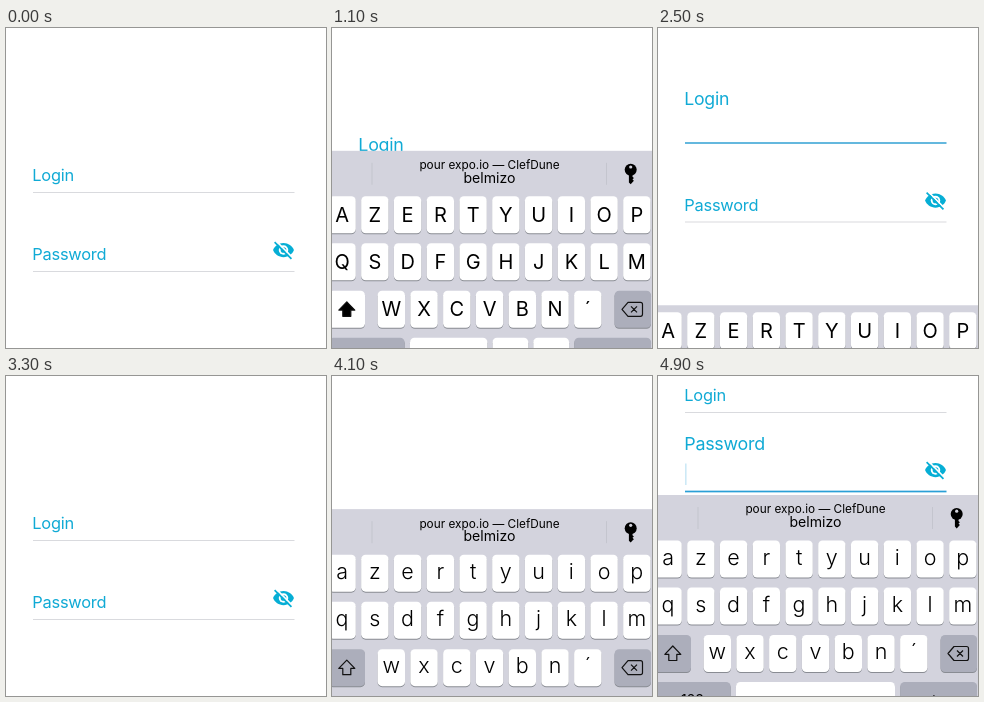
Animation of 320x320 px, one loop 5000 ms. Source, as an HTML page:

```html
<!DOCTYPE html>
<html lang="fr">
<head>
<meta charset="utf-8">
<title>Login form</title>
<style>
  html, body { margin: 0; width: 100%; height: 100%; overflow: hidden; background: #fff; }
  svg { display: block; width: 100%; height: 100%; }
  text { font-family: Inter, Roboto, "Liberation Sans", sans-serif; }
  .label { font-size: 16.4px; letter-spacing: -.015em; fill: #10aad5; }
  .caret { fill: #2a9fd6; }
  .keys text, .bar text { text-anchor: middle; fill: #000; }
  .bar rect { fill: #c4c5ce; }
</style>
</head>
<body>
<svg id="stage" viewBox="0 0 320 320">
  <g id="page"></g>
  <g id="keyboard">
    <rect id="tray" x="-4" width="328" height="230" fill="#d3d3dd"/>
    <g id="bar" class="bar">
      <rect x="39.5" y="12" width="1" height="22"/>
      <rect x="274" y="12" width="1" height="22"/>
      <text x="157.5" y="18.4" font-size="11.8">pour expo.io — ClefDune</text>
      <text x="157.5" y="32.3" font-size="14.1">belmizo</text>
      <g transform="translate(298.7 13)">
        <path d="M-1.8 10H1.8V13L3.2 14.3L1.8 15.6L3.2 17L1.8 18.4L0 20.4L-1.8 18.6Z"/>
        <circle cy="6" r="6"/>
        <circle cy="3.2" r="1.6" fill="#d3d3dd"/>
      </g>
    </g>
  </g>
</svg>
<script>
const LOOP = 5000;
const FLOAT = -30.5;
const PITCH = 32.75, KEY_W = 27.4, KEY_H = 37;
const ROWS = [45.5, 92.5, 140, 187];
const GRAY = '#acaebb', WHITE = '#fff';
const KEYBOARD_TOP = 119;

const byId = id => document.getElementById(id);

function add(parent, tag, attrs = {}, text) {
  const el = document.createElementNS('http://www.w3.org/2000/svg', tag);
  for (const name in attrs) el.setAttribute(name, attrs[name]);
  if (text) el.textContent = text;
  parent.append(el);
  return el;
}

// Form
function makeField(name, baseline) {
  const g = add(byId('page'), 'g');
  const line = add(g, 'rect', { x: 27, width: 261.5 });
  const caret = add(g, 'rect', { class: 'caret', x: 27, y: baseline - 16.5, width: 1.6, height: 21.5 });
  const label = add(g, 'text', { class: 'label' }, name);
  return { baseline, line, caret, label };
}

function makeEye(x, y) {
  const g = add(byId('page'), 'g', { transform: `translate(${x} ${y}) scale(.95) translate(-12 -12)`, fill: '#06aed5' });
  add(g, 'path', { d: 'M1 12C2.7 7.6 7 4.5 12 4.5S21.3 7.6 23 12C21.3 16.4 17 19.5 12 19.5S2.7 16.4 1 12Z' });
  add(g, 'circle', { cx: 12, cy: 12, r: 5, fill: WHITE });
  add(g, 'circle', { cx: 12, cy: 12, r: 3 });
  add(g, 'path', { d: 'M3 1.45L22 20.45', stroke: WHITE, 'stroke-width': 1.8 });
  add(g, 'path', { d: 'M2.64 3.64L20.36 21.36', stroke: '#06aed5', 'stroke-width': 1.8 });
}

const login = makeField('Login', 153);
const password = makeField('Password', 232);
makeEye(277.5, 222);

// Keyboard
function makeKey(g, x, y, width, fill, text, size, baseline, weight = 400) {
  const box = { x, width, height: KEY_H, rx: 4.5 };
  add(g, 'rect', { ...box, y: y + 1, fill: '#898c93' });
  add(g, 'rect', { ...box, y, fill });
  if (text) add(g, 'text', { x: x + width / 2, y: y + baseline, 'font-size': size, 'font-weight': weight }, text);
}

function makeKeys(upper) {
  const g = add(byId('keyboard'), 'g', { class: 'keys' });
  const style = upper ? [20, 25.7, 400] : [21.5, 24.3, 300];
  ['azertyuiop', 'qsdfghjklm', 'wxcvbn´'].forEach((letters, row) => {
    const left = row < 2 ? -3.6 : 45.6;
    [...(upper ? letters.toUpperCase() : letters)].forEach((c, i) =>
      makeKey(g, left + PITCH * i, ROWS[row], KEY_W, WHITE, c, ...style));
  });

  makeKey(g, -3.6, ROWS[2], 36.6, upper ? WHITE : GRAY);
  add(g, 'path', {
    d: 'M0-7.5L8 .8H4V7H-4V.8H-8Z', transform: `translate(14.8 ${ROWS[2] + 18.5})`,
    fill: upper ? '#000' : 'none', stroke: '#111', 'stroke-width': 1.2, 'stroke-linejoin': 'round'
  });
  makeKey(g, 282.6, ROWS[2], 36.4, GRAY);
  add(g, 'path', {
    d: 'M-10.5 0L-4.5-7H8Q10-7 10-5V5Q10 7 8 7H-4.5ZM-1.5-3L4.5 3M4.5-3L-1.5 3', transform: `translate(300.5 ${ROWS[2] + 18.5})`,
    fill: 'none', stroke: '#111', 'stroke-width': 1.2, 'stroke-linejoin': 'round'
  });

  const y = ROWS[3];
  makeKey(g, -3.6, y, 76.2, GRAY, '123', 14, 22.5);
  makeKey(g, 78, y, upper ? 77.4 : 159, WHITE, 'espace', 14, 22.5);
  if (upper) {
    makeKey(g, 160.5, y, 35.8, WHITE, '@', 19, 24);
    makeKey(g, 201.3, y, 35.8, WHITE, '.', 19, 24);
  }
  makeKey(g, 242.3, y, 76.7, GRAY, 'retour', 14, 22.5);
  return g;
}

const upperKeys = makeKeys(true);
const lowerKeys = makeKeys(false);

// Motion
const ramp = (t, from, to) => Math.min(1, Math.max(0, (t - from) / (to - from)));
const ease = (t, from, to) => {
  const p = ramp(t, from, to);
  return p * p * (3 - 2 * p);
};
const mix = (a, b, p) => a + (b - a) * p;

// Critically damped spring: the share of the way still to go.
function springLeft(elapsed) {
  if (elapsed <= 0) return 1;
  if (elapsed > 600) return 0;
  const x = elapsed * 0.01826;
  return (1 + x) * Math.exp(-x);
}

function drawField({ baseline, line, caret, label }, focus, caretOpacity) {
  label.setAttribute('transform', `translate(26.3 ${baseline + FLOAT * focus}) scale(${mix(1, 1.09, focus)})`);
  const height = mix(1, 1.7, focus);
  line.setAttribute('y', baseline + 11.5 - height / 2);
  line.setAttribute('height', height);
  const rgb = [mix(217, 42, focus), mix(218, 159, focus), mix(222, 214, focus)].map(Math.round);
  line.setAttribute('fill', `rgb(${rgb})`);
  caret.setAttribute('opacity', caretOpacity);
}

function drawKeyboard(t) {
  const closing = t >= 2290 && t < 3500;
  const second = t >= 3500;
  const top = closing
    ? KEYBOARD_TOP + (t > 2790 ? 210 : 163 * (1 - springLeft(t - 2358)))
    : KEYBOARD_TOP + 201 * springLeft(t - (second ? 3864 : 778));
  const trayTop = closing ? 38.5 : 0;
  byId('keyboard').setAttribute('transform', `translate(0 ${top})`);
  byId('tray').setAttribute('y', trayTop);
  byId('bar').setAttribute('display', closing ? 'none' : 'inline');
  upperKeys.setAttribute('display', second ? 'none' : 'inline');
  lowerKeys.setAttribute('display', second ? 'inline' : 'none');
}

function draw(t) {
  const scroll = 49.5 * (ease(t, 1340, 1600) - ease(t, 2850, 3290)) + 128 * ease(t, 4430, 4700);
  byId('page').setAttribute('transform', `translate(0 ${-scroll})`);
  drawField(login, ease(t, 790, 1040) - ease(t, 2445, 2695), t < 1100 ? 0 : 1 - ramp(t, 1880, 2000));
  drawField(password, ease(t, 3680, 3930), t < 4200 ? 0 : 1 - ramp(t, 4770, 4940));
  drawKeyboard(t);
}

const start = performance.now();
function tick() {
  draw((performance.now() - start) % LOOP);
  requestAnimationFrame(tick);
}
tick();
</script>
</body>
</html>
```
